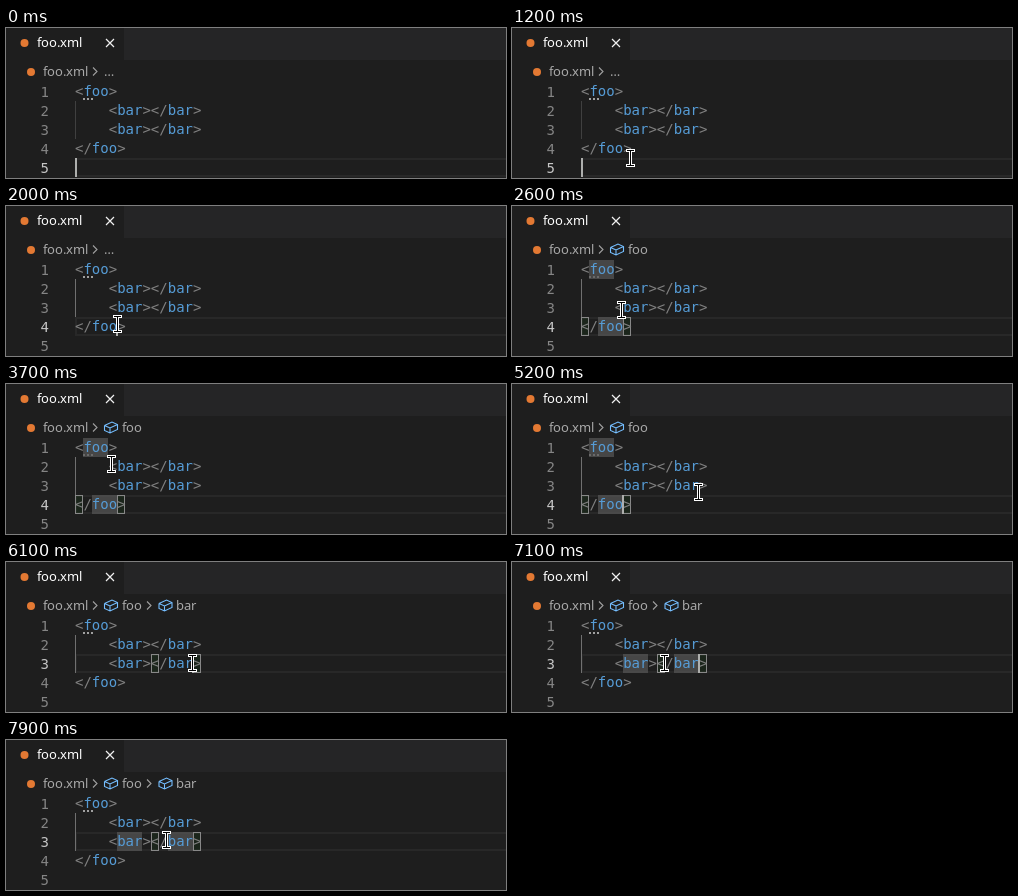
Animation of 500x150 px, one loop 8000 ms. Source, as an HTML page with a canvas:

```html
<!DOCTYPE html>
<html lang="en">
<head>
<meta charset="utf-8">
<title>Editor</title>
<style>
html, body { margin: 0; width: 100%; height: 100%; overflow: hidden; background: #1e1e1e; }
canvas { display: block; width: 500px; height: 150px; }
</style>
</head>
<body>
<canvas id="stage" width="500" height="150"></canvas>
<script>
const ctx = document.getElementById('stage').getContext('2d');
const LOOP = 8000, STEP = 100, BLINK = 500;
const LEFT = 69, TOP = 54, ROW = 19, CHAR = 8.43;
const MONO = '14px "DejaVu Sans Mono", monospace';
const UI = '13px "Noto Sans", sans-serif';
const LINES = ['<foo>', '    <bar></bar>', '    <bar></bar>', '</foo>', ''];

// Each click puts the caret behind a closing tag; words are [line, column].
const CLICKS = [
  { time: 0, line: 5, col: 0, crumbs: [], brackets: [], words: [] },
  { time: 2000, line: 4, col: 5, crumbs: ['foo'], brackets: [0, 5], words: [[1, 1], [4, 2]] },
  { time: 6000, line: 3, col: 14, crumbs: ['foo', 'bar'], brackets: [9, 14], words: [[3, 5], [3, 11]] }
];

// Pointer gestures, each slowing down towards its goal.
const HOME = { x: 136, y: 160 };
const MOVES = [
  { from: 950, to: 1500, x: 111, y: 118 },
  { from: 2500, to: 3200, x: 102, y: 66 },
  { from: 3640, to: 4100, x: 115, y: 122 },
  { from: 4600, to: 5200, x: 186, y: 108 },
  { from: 5400, to: 5600, x: 186, y: 101 },
  { from: 6930, to: 7300, x: 138, y: 101 },
  { from: 7700, to: 8000, x: 163, y: 100 }
];

const colX = col => LEFT + col * CHAR;
const rowY = line => TOP + (line - 1) * ROW;
const clamp = k => Math.min(1, Math.max(0, k));
const easeOut = k => 1 - (1 - k) ** 2;

function rect(color, x, y, w, h) {
  ctx.fillStyle = color;
  ctx.fillRect(x, y, w, h);
}

function frame(color, x, y, w, h, line) {
  ctx.strokeStyle = color;
  ctx.lineWidth = line;
  ctx.strokeRect(x + line / 2, y + line / 2, w - line, h - line);
}

function code(str, x, y, color) {
  ctx.font = MONO;
  ctx.fillStyle = color;
  ctx.fillText(str, x, y);
}

// Interface text advances by whole pixels.
function label(str, x, y, color) {
  ctx.font = UI;
  ctx.fillStyle = color;
  for (const ch of str) {
    ctx.fillText(ch, x, y);
    x += Math.round(ctx.measureText(ch).width - 0.05);
  }
}

function lines(color, width, ...polys) {
  ctx.strokeStyle = color;
  ctx.lineWidth = width;
  ctx.beginPath();
  for (const poly of polys) poly.forEach(([x, y], i) => i ? ctx.lineTo(x, y) : ctx.moveTo(x, y));
  ctx.stroke();
}

function dot(x, y) {
  ctx.fillStyle = '#e37933';
  ctx.beginPath();
  ctx.arc(x, y, 4, 0, Math.PI * 2);
  ctx.fill();
}

function cube(x, y) {
  const a = [x - 6.5, y - 2], b = [x + 1, y - 5.5], c = [x + 6.5, y - 3];
  const d = [x + 6.5, y + 2], e = [x - 1, y + 5.5], f = [x - 6.5, y + 3], mid = [x - 1, y + 0.5];
  lines('#75beff', 1.1, [a, b, c, d, e, f, a], [a, mid, c], [mid, e]);
}

const chevron = x => lines('#a0a0a0', 1.1, [[x - 2, 39.5], [x + 2, 43.5], [x - 2, 47.5]]);

function drawHeader(crumbs) {
  rect('#252526', 118, 0, 382, 32);
  dot(18.5, 15);
  label('foo.xml', 31, 19, '#ffffff');
  lines('#f0f0f0', 1.2, [[100, 11], [108, 19]], [[108, 11], [100, 19]]);

  dot(25, 44);
  label('foo.xml', 37, 48, '#a9a9a9');
  chevron(89);
  if (!crumbs.length) label('…', 98, 48, '#a9a9a9');
  crumbs.forEach((name, i) => {
    const x = 105 + i * 54.5;
    if (i) chevron(x - 16.5);
    cube(x, 43.5);
    label(name, Math.round(x + 10.5), 48, '#a9a9a9');
  });
}

function drawCode(line, brackets, words) {
  const y = rowY(line);
  frame('#282828', LEFT, y, 500, ROW, 2);
  rect(line < 5 ? '#707070' : '#404040', LEFT, rowY(2), 1, ROW * 2);

  for (let i = 0; i < 3; i++) rect('#a0a0a0', 77 + i * 4, 70, 2, 2);

  for (const [row, col] of words)
    rect('rgba(87,87,87,0.72)', Math.round(colX(col)), rowY(row), 25, ROW);

  for (const col of brackets) {
    const x = Math.round(colX(col));
    rect('rgba(0,100,0,0.1)', x, y, 8, ROW);
    frame('#888888', x, y, 8, ROW, 1);
  }

  LINES.forEach((str, i) => {
    const base = rowY(i + 1) + 14;
    code(String(i + 1), 34.6, base + 1, i + 1 === line ? '#c6c6c6' : '#858585');
    for (const part of str.matchAll(/<\/?|>|\w+/g))
      code(part[0], colX(part.index), base, /\w/.test(part[0]) ? '#569cd6' : '#808080');
  });
}

function drawCaret({ time, line, col }, t) {
  if (Math.floor((t - time) / BLINK) % 2) return;
  const x = Math.round(colX(col)) - (col ? 1 : 0);
  rect('#aeafad', x, rowY(line), 2, ROW);
}

function pointerAt(t) {
  let { x, y } = HOME;
  for (const move of MOVES) {
    const k = easeOut(clamp((t - move.from) / (move.to - move.from)));
    x += (move.x - x) * k;
    y += (move.y - y) * k;
  }
  return [Math.round(x), Math.round(y)];
}

// Black I-beam with a white outline
function drawPointer(x, y) {
  for (const [color, inset] of [['#ffffff', 0], ['#000000', 1]]) {
    const w = 9 - inset * 2, h = 3 - inset * 2;
    rect(color, x - 4 + inset, y - 9 + inset, w, h);
    rect(color, x - 4 + inset, y + 6 + inset, w, h);
    rect(color, x - 1 + inset, y - 8, 3 - inset * 2, 16);
  }
}

function draw(t) {
  const clickAt = time => CLICKS.filter(c => c.time <= Math.max(time, 0)).pop();
  const click = clickAt(t);
  // Breadcrumbs and brackets lag one step behind a click, word marks two.
  const shown = (lag, list) => clickAt(t - lag * STEP) === click ? list : [];
  rect('#1e1e1e', 0, 0, 500, 150);
  drawHeader(clickAt(t - STEP).crumbs);
  drawCode(click.line, shown(1, click.brackets), shown(2, click.words));
  drawCaret(click, t);
  drawPointer(...pointerAt(t));
}

const start = performance.now();
function tick() {
  const t = (performance.now() - start) % LOOP;
  draw(Math.floor(t / STEP) * STEP);
  requestAnimationFrame(tick);
}
tick();
</script>
</body>
</html>
```
